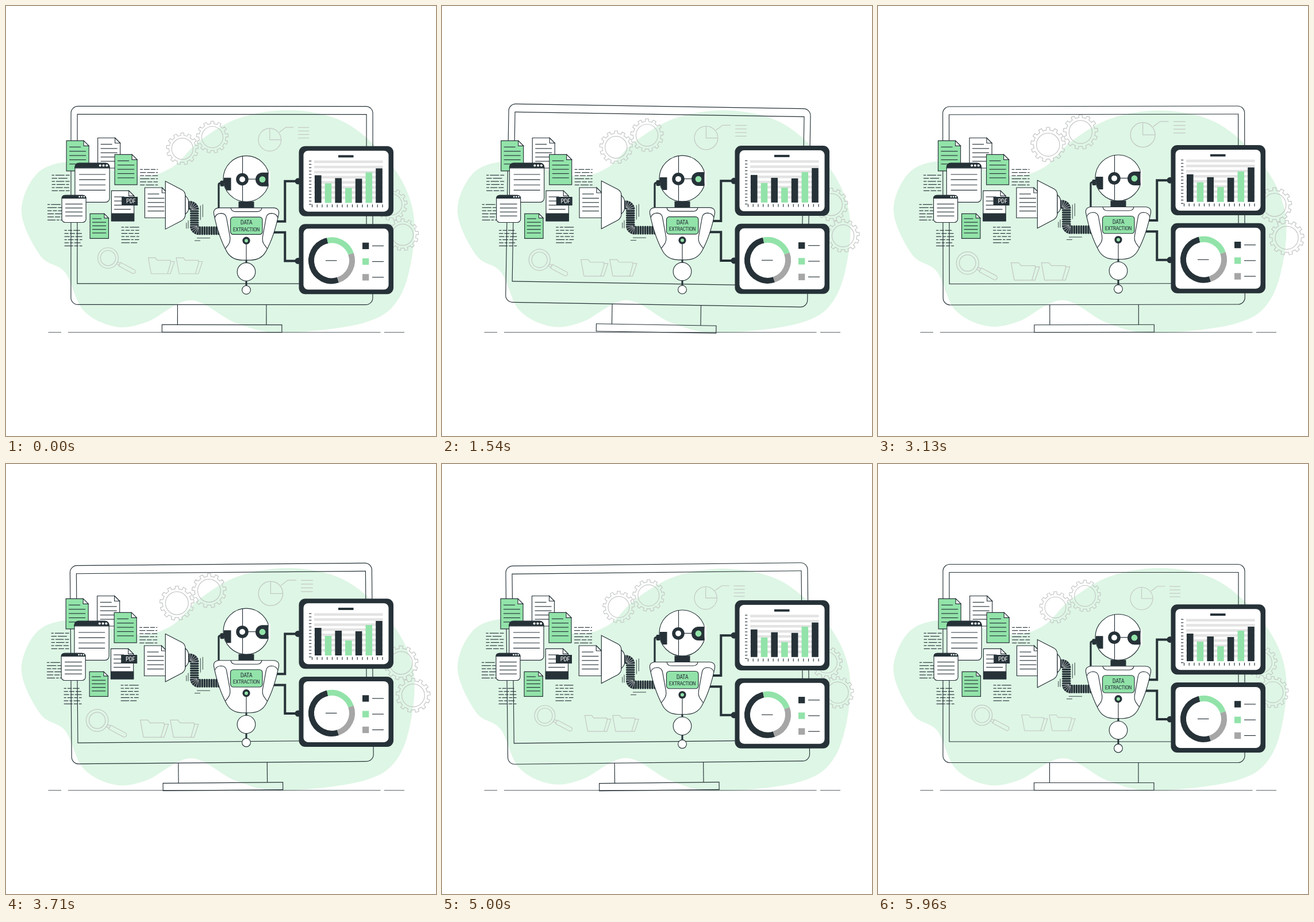
Recreate the animation shown at these times as an HTML page with a canvas. Size 748 by 748 pixels, loop 6 s.

```html
<!DOCTYPE html>
<html lang="en">
<head>
<meta charset="utf-8">
<title>Data extraction</title>
<style>
html, body { margin: 0; width: 100%; height: 100%; overflow: hidden; background: #fff; }
canvas { display: block; width: 100vw; height: 100vh; }
</style>
</head>
<body>
<canvas id="stage" width="748" height="748"></canvas>
<script>
const ctx = document.getElementById('stage').getContext('2d');
const DARK = '#263238', GREEN = '#92e3a9', MINT = '#def6e5', GREY = '#a6a6a6', PALE = '#c3c8c5', WHITE = '#fff';
const FONT = '"Bebas Neue", "Roboto Condensed", "Liberation Sans Narrow", Roboto, sans-serif';
const LOOP = 6000, FPS = 24, TAU = Math.PI * 2, THIN = 1.15;

// ---------- drawing helpers ----------
const times = (n, draw) => { for (let i = 0; i < n; i++) draw(i); };

function paint(fill, stroke, width = THIN) {
  if (fill) { ctx.fillStyle = fill; ctx.fill(); }
  if (stroke) { ctx.strokeStyle = stroke; ctx.lineWidth = width; ctx.stroke(); }
}
function box(x, y, w, h, r, fill, stroke) {
  ctx.beginPath();
  ctx.roundRect(x, y, w, h, r);
  paint(fill, stroke);
}
function disc(x, y, r, fill, stroke) {
  ctx.beginPath();
  ctx.arc(x, y, r, 0, TAU);
  paint(fill, stroke);
}
function shape(d, fill, stroke, width = THIN) {
  const p = new Path2D(d);
  if (fill) { ctx.fillStyle = fill; ctx.fill(p); }
  if (stroke) { ctx.strokeStyle = stroke; ctx.lineWidth = width; ctx.stroke(p); }
}
function line(x1, y1, x2, y2, color = DARK, width = THIN) {
  ctx.beginPath();
  ctx.moveTo(x1, y1);
  ctx.lineTo(x2, y2);
  paint(null, color, width);
}
function label(text, x, y, maxSize, maxWidth, color) {
  ctx.letterSpacing = '-0.4px';
  ctx.font = `condensed ${maxSize}px ${FONT}`;
  const size = Math.min(maxSize, maxSize * maxWidth / ctx.measureText(text).width);
  ctx.font = `condensed ${size}px ${FONT}`;
  ctx.textAlign = 'center';
  ctx.fillStyle = color;
  ctx.fillText(text, x, y + size * 0.36);
}
function group(draw, { x = 0, y = 0, turn = 0, zoom = 1, cx = 0, cy = 0 }) {
  ctx.save();
  ctx.translate(cx + x, cy + y);
  ctx.rotate(turn * Math.PI / 180);
  ctx.scale(zoom, zoom);
  ctx.translate(-cx, -cy);
  draw();
  ctx.restore();
}
// Draws once as given and once flipped about a vertical axis.
function mirrored(axis, draw) {
  for (const side of [1, -1]) {
    ctx.save();
    ctx.translate(axis, 0);
    ctx.scale(side, 1);
    draw();
    ctx.restore();
  }
}
function randomizer(seed) {
  return () => (seed = seed * 16807 % 2147483647) / 2147483647;
}

// ---------- motion ----------
const clamp = k => Math.max(0, Math.min(1, k));
const smooth = k => k * k * (3 - 2 * k);
const phase = (s, period) => (s / period) % 1;
const tri = p => 1 - Math.abs(2 * (((p % 1) + 1) % 1) - 1);
const sway = p => 2 * tri(p + .25) - 1;
const hover = p => -10 * tri(p);
const pulse = p => smooth(clamp(Math.min(p / .12, (.3 - p) / .18)));
const beat = p => 1 + .1 * (pulse(p) + pulse(p - .34));

// Ten swings per cycle that double up to 4px and die away again.
function jolt(i) {
  const n = Math.min(i, 10 - i);
  return n <= 0 ? 0 : (-1) ** n * Math.min(4, 2 ** (n - 1));
}
function shake(p) {
  const i = Math.floor(p * 10);
  return jolt(i) + (jolt(i + 1) - jolt(i)) * smooth(p * 10 - i);
}

// ---------- backdrop ----------
const BLOB = [[27, 360], [52, 294], [105, 272], [170, 283], [238, 297], [290, 280], [335, 236], [405, 195],
  [495, 181], [585, 200], [655, 257], [700, 328], [710, 405], [686, 504], [625, 550], [480, 568], [400, 551],
  [322, 512], [245, 550], [190, 558], [135, 530], [103, 464], [60, 435]];

function blob() {
  const n = BLOB.length, at = i => BLOB[(i + n) % n];
  ctx.beginPath();
  ctx.moveTo(...at(0));
  times(n, i => {
    const [a, b, c, d] = [at(i - 1), at(i), at(i + 1), at(i + 2)];
    ctx.bezierCurveTo(b[0] + (c[0] - a[0]) / 6, b[1] + (c[1] - a[1]) / 6,
      c[0] - (d[0] - b[0]) / 6, c[1] - (d[1] - b[1]) / 6, c[0], c[1]);
  });
  paint(MINT);
}

function gear(x, y) {
  const teeth = 13, step = TAU / teeth;
  ctx.beginPath();
  times(teeth, i => {
    const a = i * step - TAU / 4;
    ctx.arc(x, y, 27.3, a - .2 * step, a + .2 * step);
    ctx.arc(x, y, 23, a + .25 * step, a + .75 * step);
  });
  ctx.closePath();
  paint(null, PALE);
  disc(x, y, 18.3, null, PALE);
}

function folder(x) {
  ctx.save();
  ctx.translate(x, 436.5);
  shape('M5 27.5 L0 0 H12 L15.5 4.5 H38 V7 M5 27.5 H38 L45 6.5 H39 L33 27.5', null, PALE);
  ctx.restore();
}

function magnifier(x, y) {
  disc(x, y, 17.7, null, PALE);
  disc(x, y, 13, null, PALE);
  ctx.save();
  ctx.translate(x, y);
  ctx.rotate(.49);
  ctx.beginPath();
  ctx.rect(17.7, -2, 5, 4);
  ctx.roundRect(22.7, -3.5, 30, 7, [0, 3.5, 3.5, 0]);
  paint(null, PALE);
  ctx.restore();
}

function doodles() {
  gear(308.5, 249.5);
  gear(360, 229.5);
  gear(667, 345);
  gear(686.5, 397);
  disc(458.5, 234, 19.5, null, PALE);
  shape('M458.5 214.5 V234 H478 M475 221 L486 212.7 H499.5', null, PALE);
  times(4, i => line(507, 213 + i * 6, 526, 213 + i * 6, PALE));
  magnifier(181, 437);
  folder(250);
  folder(298);
}

function monitor() {
  box(113, 174.5, 525, 345, 12, null, DARK);
  box(124, 188.5, 503, 294.5, 0, null, DARK);
  line(298.5, 519.5, 298.5, 554.5);
  line(453, 519.5, 453, 554.5);
  box(271.5, 554.5, 208.5, 13, 0, null, DARK);
}

function ground() {
  line(73.5, 567.7, 96, 567.7, DARK, .8);
  line(108, 567.7, 651.5, 567.7, DARK, .8);
  line(658, 567.7, 693, 567.7, DARK, .8);
}

// ---------- documents ----------
function paper(x, y, w, h, fill, fold = 9) {
  const r = x + w;
  shape(`M${x} ${y} H${r - fold} L${r} ${y + fold} V${y + h} H${x} Z`, fill, DARK);
  shape(`M${r - fold} ${y} V${y + fold} H${r} Z`, WHITE, DARK);
}
function rows(x, y, w, gap, count, first = w) {
  times(count, i => line(x, y + i * gap, x + (i ? w : first), y + i * gap));
}
function sheet(x, y, fill) {
  paper(x, y, 39, 52.5, fill);
  rows(x + 5, y + 11, 29, 7.4, 5, 20);
}
function scribble(x, y) {
  const rand = randomizer(Math.round(x * 31 + y));
  times(6, row => {
    for (let at = 0; at < 29;) {
      const end = Math.min(31, at + 4 + rand() * 13);
      line(x + at, y + row * 5.4, x + end, y + row * 5.4);
      at = end + 2;
    }
  });
}
function browser(x, y, w, h, r, bar, dot) {
  box(x, y, w, h, r, WHITE, DARK);
  box(x, y, w, bar, [r, r, 0, 0], DARK, DARK);
  times(3, i => disc(x + w - dot * (2.4 + i * 2.9), y + bar / 2, dot, WHITE));
}

function papers() {
  scribble(79.5, 294.3);
  scribble(233, 284.3);
  scribble(72, 345.3);
  scribble(101.5, 390.3);
  scribble(200.5, 384.8);
  sheet(105, 234.3, GREEN);
  sheet(159.5, 229.5, WHITE);
  sheet(189, 258.3, GREEN);
  browser(119.8, 273.3, 60.2, 68, 7, 8.5, 2);
  rows(127, 293, 46, 9.1, 4);
  browser(97, 329.3, 42, 47.2, 6, 5, 1.4);
  rows(103, 344.5, 30, 6.9, 4);
  paper(183.3, 321.3, 39.2, 52.5, WHITE);
  rows(188, 332, 29, 7.2, 4, 18);
  box(183.3, 361, 39.2, 12.8, 0, DARK, DARK);
  box(201, 332, 28, 15, 0, DARK);
  label('PDF', 217, 339.5, 13, 16.5, WHITE);
  paper(146, 361.3, 32.3, 43, GREEN, 7.5);
  rows(150, 370, 24, 6.2, 5, 16);
  sheet(241.3, 316, WHITE);
}

// ---------- hose and funnel ----------
function fan(x, y, from) {
  ctx.beginPath();
  ctx.moveTo(x, y);
  ctx.arc(x, y, 15.5, from, from + TAU / 4);
  paint(DARK);
  times(6, i => {
    const a = from + i * TAU / 20, c = Math.cos(a), s = Math.sin(a);
    line(x + 3 * c, y + 3 * s, x + 16 * c, y + 16 * s, WHITE, .7);
  });
}

function funnel() {
  shape('M277.3 305.7 L306 320.5 Q312 324 312 331 V363 Q312 370 306 374 L277.3 389 Z', WHITE, DARK);
  shape('M312 331 Q317.5 336 317.5 341 V354 Q317.5 358 312 363 Z', WHITE, DARK);
  box(317, 340, 4, 15, 1, DARK);
  fan(320, 355.5, -TAU / 4);
  times(7, i => box(320, 356 + i * 4, 15.5, 3.3, 1.5, DARK));
  fan(335.5, 383.5, TAU / 4);
  times(9, i => box(335.5 + i * 4.1, 384, 3.4, 15, 1.5, DARK));
  shape('M338.3 348 V373 M342.3 346 V368 M313.8 378 V388 M317 374 V388 M332 404.5 H355 M328 409 H338', null, DARK, .9);
}

// ---------- robot ----------
function head() {
  shape('M370 360 V312 Q370 309 373 309 H380', null, DARK, 3.2);
  box(372.5, 304.5, 7, 10, 2, DARK);
  disc(418, 301.5, 40, WHITE, DARK);
  line(411.5, 262, 411.5, 341);
  line(411, 302, 435, 302);
  shape('M379 299.5 H391.5 V321.5 H384 Q379 314 378.5 304 Z', DARK);
  disc(411, 302.3, 10.8, DARK);
  disc(411, 302.3, 5, WHITE);
  box(456.7, 288, 3, 28, 0, WHITE);
  box(434, 290.5, 22.5, 24, [12, 0, 0, 12], DARK);
  disc(446, 302.5, 5.4, GREEN);
  box(404.5, 341, 27, 11, 0, DARK);
}

function torso() {
  mirrored(418, () => shape('M.3 352 H-47 Q-57.5 352.5 -56.5 362 C-52 385 -44 410 -34 428 Q-26 442.5 -7 443 H.3', WHITE));
  mirrored(418, () => {
    shape('M0 352 H-47 Q-57.5 352.5 -56.5 362 C-52 385 -44 410 -34 428 Q-26 442.5 -7 443 H0', null, DARK);
    shape('M-27 352 Q-26 358.5 -19 358.5 H0', null, DARK);
    shape('M-54.5 369 Q-53 362 -44 361.5 Q-36 361.5 -34.5 369 L-28.5 402 Q-27 411 -32 417 L-36.5 423', null, DARK);
  });
  line(418, 415, 418, 443);
  box(390.5, 368, 55.5, 30.3, 5, GREEN, DARK);
  label('DATA', 418, 377.3, 13.5, 21, DARK);
  label('EXTRACTION', 418, 389.3, 13.5, 47.5, DARK);
  disc(418, 409, 6.6, DARK);
  disc(418, 409, 3, GREEN);
}

function robot() {
  head();
  torso();
  line(418, 443, 418, 488, DARK, 3);
  disc(418, 463.3, 15.8, WHITE, DARK);
  disc(418, 494.8, 7.4, WHITE, DARK);
}

// ---------- dashboards ----------
function panel(y) {
  box(509.5, y, 164.5, 122, 11, DARK);
  box(517.5, y + 8, 148, 106, 8, WHITE);
}

function barChart() {
  panel(244.5);
  box(578, 260.3, 26.5, 4, 0, DARK);
  times(8, i => box(536, 269.7 + i * 8.9, 119.5, 4.5, 0, '#e3e3e3'));
  [48, 34, 43, 26, 42, 53, 60].forEach((h, i) => {
    box(537 + i * 17.7, 343.3 - h, 11.6, h, 0, i % 2 ? GREEN : DARK);
  });
  times(14, i => line(527, 270.5 + i * 5.8, 531.3, 270.5 + i * 5.8));
  times(15, i => line(532.5 + i * 8.75, 346, 532.5 + i * 8.75, 351));
}

function ringChart() {
  panel(380.2);
  let from = .2 * TAU;
  [[DARK, .517], [GREEN, .23], [GREY, .253]].forEach(([color, share], i) => {
    ctx.beginPath();
    ctx.arc(566.5, 443.7, 35.5, from, from += share * TAU);
    paint(null, color, 10);
    const y = 412.5 + i * 27.3;
    box(620, y, 11.3, 11.3, 0, color);
    line(637, y + 5.6, 657, y + 5.6);
  });
  line(556, 443.7, 575.5, 443.7);
}

function dashboards() {
  shape('M466 375.5 H485.3 V305.7 H508 M462 394.7 H485.3 V444.3 H508', null, DARK, 4);
  disc(508, 305.7, 5.5, DARK);
  disc(508, 444.3, 5.5, DARK);
  barChart();
  ringChart();
}

function machine() {
  funnel();
  dashboards();
  robot();
}

// ---------- scene ----------
function scene(ms) {
  const s = (Math.floor((ms % LOOP + 5) * FPS / 1000) + 1) / FPS;
  const fast = phase(s, 1.5);
  ctx.fillStyle = WHITE;
  ctx.fillRect(0, 0, 748, 748);
  group(blob, { turn: sway(fast), cx: 369, cy: 374.5 });
  group(doodles, { zoom: beat(fast), cx: 437, cy: 334 });
  ground();
  group(monitor, { turn: sway(phase(s, 6)), cx: 375.5, cy: 371 });
  group(papers, { x: .2 + shake(phase(s, 3)) });
  group(machine, { y: hover(fast) - .3 });
}

const start = performance.now();
function tick() {
  scene(performance.now() - start);
  requestAnimationFrame(tick);
}
tick();
</script>
</body>
</html>
```
